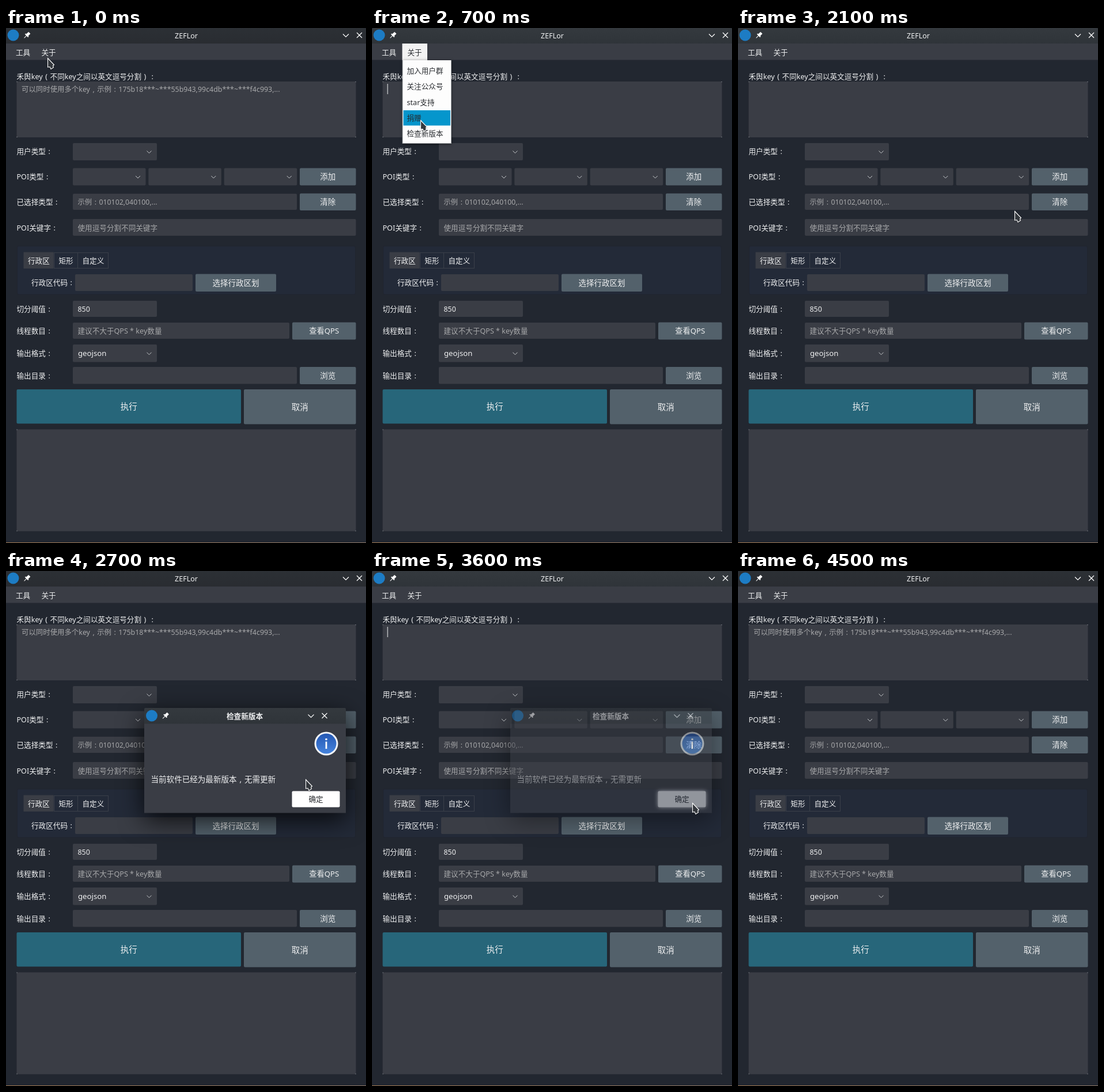
These frames come from a looping animation (625 px wide and 895 px high, 4.7 s). An HTML page with a canvas:

```html
<!DOCTYPE html>
<html lang="zh-CN">
<head>
<meta charset="utf-8">
<style>
html, body { margin: 0; width: 100%; height: 100%; overflow: hidden; background: #222730; }
canvas { display: block; }
</style>
</head>
<body>
<canvas id="stage" width="625" height="895"></canvas>
<script>
const stage = document.getElementById("stage").getContext("2d");
const layer = new OffscreenCanvas(625, 895).getContext("2d");
let ctx = stage;
const LOOP = 4700, STEP = 100;
const LIGHT = "#eff0f1", FIELD = "#3a3d45", BUTTON = "#53616b", HINT = "#a7a8aa", DARK = "#26292d";

// Pointer stops: time, x, y
const PATH = [
  [0, 72, 52], [100, 72, 50], [200, 72, 46], [300, 74, 62], [600, 84, 158], [700, 84, 160],
  [900, 101, 181], [1000, 101, 181], [1100, 106, 183], [1200, 175, 196], [1600, 455, 289],
  [1700, 477, 315], [1800, 480, 318], [2600, 480, 318], [2700, 520, 362], [2800, 552, 402],
  [3000, 552, 402], [3100, 560, 403], [3500, 560, 403], [3600, 556, 403], [3700, 536, 402],
  [4000, 410, 4], [4100, 400, -30], [4700, 400, -30]
];

function pointerAt(t) {
  const i = Math.max(1, PATH.findIndex(p => p[0] > t));
  const [t0, x0, y0] = PATH[i - 1], [t1, x1, y1] = PATH[i];
  const k = (t - t0) / (t1 - t0);
  return [x0 + (x1 - x0) * k, y0 + (y1 - y0) * k];
}

const ramp = (t, a, b) => Math.min(1, Math.max(0, (t - a) / (b - a)));

// Paints a group on its own layer so that it fades as a whole
function fade(alpha, paint) {
  if (!alpha) return;
  ctx = layer;
  ctx.clearRect(0, 0, 625, 895);
  ctx.save();
  paint();
  ctx.restore();
  ctx = stage;
  ctx.globalAlpha = alpha;
  ctx.drawImage(layer.canvas, 0, 0);
  ctx.globalAlpha = 1;
}

function shadow(color, blur = 0, dy = 0) {
  ctx.shadowColor = color;
  ctx.shadowBlur = blur;
  ctx.shadowOffsetY = dy;
}

function box(x0, y0, x1, y1, fill = FIELD, radius = 2) {
  ctx.fillStyle = fill;
  ctx.beginPath();
  ctx.roundRect(x0, y0, x1 - x0, y1 - y0, radius);
  ctx.fill();
}

// Full-width punctuation is centred in its cell
const NARROW = { "，": ",", "：": ":", "（": "(", "）": ")" };
const centred = str => str.replace(/[，：（）]/g, c => `\u200a ${NARROW[c]} \u200a`);

function text(str, x, y, { size = 12.6, color = LIGHT, align = "left", weight = 400 } = {}) {
  ctx.font = `${weight} ${size}px "Noto Sans", "Noto Sans CJK SC", sans-serif`;
  ctx.fillStyle = color;
  ctx.textAlign = align;
  ctx.fillText(centred(str), x, y + size * 0.37);
}

function stroke(points, color = LIGHT, width = 1) {
  ctx.strokeStyle = color;
  ctx.lineWidth = width;
  ctx.beginPath();
  points.forEach(([x, y]) => ctx.lineTo(x, y));
  ctx.stroke();
}

function disc(x, y, r, fill) {
  ctx.fillStyle = fill;
  ctx.beginPath();
  ctx.arc(x, y, r, 0, 7);
  ctx.fill();
}

const chevron = (x, y, r = 4, color = "#c4c7ca", width = 1) =>
  stroke([[x - r, y - r / 2], [x, y + r / 2], [x + r, y - r / 2]], color, width);

function button(label, x0, y0, x1, y1, size = 13.5, fill = BUTTON) {
  box(x0, y0, x1, y1, fill);
  text(label, (x0 + x1) / 2, (y0 + y1) / 2, { size, align: "center" });
}

function combo(x0, y0, x1, y1) {
  box(x0, y0, x1, y1);
  chevron(x1 - 13.5, (y0 + y1) / 2 + 0.5);
}

function pane(x0, y0, x1, y1) {
  box(x0, y0, x1, y1, FIELD, 1);
  ctx.fillStyle = "#a9acb0";
  for (const x of [x0, x1 - 1]) for (const y of [y0, y1 - 1]) ctx.fillRect(x, y, 1, 1);
}

function titleBar(x0, y0, x1, height, [top, bottom]) {
  const shade = ctx.createLinearGradient(0, y0, 0, y0 + height);
  shade.addColorStop(0, top);
  shade.addColorStop(1, bottom);
  box(x0, y0, x1, y0 + height, shade, [3, 3, 0, 0]);
}

function titleIcons(x, y, chevronX, closeX) {
  disc(x, y, 10, "#1d7cc4");
  ctx.save();
  ctx.translate(x + 24, y);
  ctx.rotate(Math.PI / 4);
  ctx.fillStyle = "#fff";
  ctx.fillRect(-2.3, -6, 4.6, 6);
  ctx.fillRect(-3.8, -0.5, 7.6, 2);
  ctx.fillRect(-0.5, 1, 1, 6);
  ctx.restore();
  chevron(chevronX, y + 0.5, 5, "#fff", 1.2);
  const r = 4.5;
  stroke([[closeX - r, y - r], [closeX + r, y + r]], "#fff", 1.2);
  stroke([[closeX - r, y + r], [closeX + r, y - r]], "#fff", 1.2);
}

function drawWindow(active, menuOpen, caret) {
  box(0, 0, 625, 895, "#222730", 0);
  titleBar(0, 0, 625, 28, active ? ["#34393e", "#2f3439"] : ["#2c3035", "#292c31"]);
  titleIcons(12.5, 12.5, 590, 613.5);
  text("ZEFLor", 313, 13, { size: 12.5, align: "center" });

  box(0, 27, 625, 55.5, FIELD, 0);
  if (menuOpen) box(52.5, 27, 96, 56, "#f3f3f3", 0);
  text("工具", 17, 42);
  text("关于", 61.5, 42, { color: menuOpen ? DARK : LIGHT });

  text("禾舆key（不同key之间以英文逗号分割）：", 18.5, 84);
  pane(18.5, 93, 607.5, 190);
  if (!active) text("可以同时使用多个key，示例：175b18***~***55b943,99c4db***~***f4c993,...", 27, 106.5, { size: 12.42, color: HINT });
  if (caret) box(26.5, 97, 27.7, 115, "#d5d7d9", 0);

  const labels = { "用户类型": 214.5, "POI类型": 258.5, "已选择类型": 302, "POI关键字": 347,
    "切分阈值": 488, "线程数目": 526, "输出格式": 565, "输出目录": 604 };
  for (const name in labels) text(name + "：", 18.5, labels[name]);

  combo(116, 200, 262, 230);
  for (const x of [116, 247.3, 378.7]) combo(x, 243.5, x + 126.5, 273.5);
  button("添加", 510, 243.5, 607.5, 273.5);

  box(116, 288, 505, 316);
  text("示例：010102,040100,...", 124.5, 302, { size: 12.35, color: HINT });
  button("清除", 510, 287.5, 607.5, 317);

  box(116, 332, 607.5, 361);
  text("使用逗号分割不同关键字", 124.5, 347, { color: HINT });

  box(19, 378.5, 607, 463.5, "#20252f");
  box(20, 379.5, 606, 462.5, "#232a38");
  box(30.5, 389.5, 82.5, 418, FIELD, 0);
  ctx.strokeStyle = "#3a3f49";
  ctx.lineWidth = 1;
  ctx.strokeRect(83.5, 390.5, 41, 27);
  ctx.strokeRect(124.5, 390.5, 53, 27);
  text("行政区", 38, 404.5);
  text("矩形", 91.5, 404.5);
  text("自定义", 132.5, 404.5);
  text("行政区代码：", 44, 442.5);
  box(120, 428, 324, 457);
  button("选择行政区划", 329, 427.5, 469, 458);

  box(116, 474, 262, 502);
  text("850", 124.5, 488.5, { size: 12.4 });
  box(116, 512, 492, 540);
  text("建议不大于QPS * key数量", 124.5, 526, { color: HINT });
  button("查看QPS", 497, 511.5, 607.5, 541.5, 13.2);
  combo(116, 550, 262, 580.5);
  text("geojson", 125, 565, { size: 13.2 });
  box(116, 589, 505, 618.5);
  button("浏览", 510, 589, 607.5, 619);
  button("执行", 18.5, 628, 408, 687.5, 14.5, "#27667a");
  button("取消", 413, 628, 607.5, 688.5, 14.5);
  pane(18.5, 697.5, 607.5, 874.5);

  const edge = ctx.createLinearGradient(0, 0, 625, 0);
  edge.addColorStop(0, "#a07850");
  edge.addColorStop(1, "#8d7868");
  box(0, 894, 625, 895, edge, 0);
}

function drawMenu(selected) {
  shadow("rgba(0,0,0,.5)", 5, 1);
  box(52.5, 56, 138, 201, "#9a9da0", 0);
  shadow("transparent");
  box(53.5, 56, 137, 200, "#fdfdfd", 0);
  ["加入用户群", "关注公众号", "star支持", "捐赠", "检查新版本"].forEach((item, i) => {
    const y = 61 + 27.2 * i;
    if (i === selected) box(54.5, y + 0.5, 136, y + 27, "#0596cc", 0);
    text(item, 60.5, y + 13.5, { color: DARK });
  });
}

function drawDialog(hover) {
  shadow("rgba(0,0,0,.8)", 44, 12);
  box(240, 238, 590, 420.5, FIELD, [3, 3, 0, 0]);
  shadow("transparent");
  titleBar(240, 238, 590, 27.5, ["#34393e", "#2f3439"]);
  titleIcons(253, 251.5, 529.5, 553);
  text("检查新版本", 414.5, 252.5, { align: "center", weight: 700 });

  disc(556, 300, 20.5, "#f4f6f8");
  const blue = ctx.createLinearGradient(0, 283, 0, 317);
  blue.addColorStop(0, "#2458b4");
  blue.addColorStop(1, "#4583dc");
  disc(556, 300, 17.5, blue);
  disc(556, 292.5, 1.8, "#fff");
  box(554.6, 296.5, 557.4, 309, "#fff", 0);

  text("当前软件已经为最新版本，无需更新", 251.5, 361.5, { size: 13.55 });
  if (hover) shadow("#fff", 7);
  box(496.5, 382.5, 579.5, 410.5, "#fff");
  shadow("transparent");
  text("确定", 538, 396.5, { align: "center", color: DARK });
}

function drawPointer(x, y) {
  ctx.save();
  ctx.translate(x, y);
  shadow("rgba(0,0,0,.4)", 3, 1);
  ctx.beginPath();
  for (const [px, py] of [[0.5, 0.5], [11.5, 12], [9.5, 13.5], [10.5, 16.5], [6, 19.5], [4, 15.5], [0.5, 16]]) ctx.lineTo(px, py);
  ctx.closePath();
  ctx.fillStyle = "#34383d";
  ctx.fill();
  shadow("transparent");
  ctx.strokeStyle = "#fff";
  ctx.lineWidth = 1.1;
  ctx.stroke();
  ctx.restore();
}

function draw(now) {
  const t = Math.floor(now % LOOP / STEP) * STEP;
  const [x, y] = pointerAt(t);
  const early = t >= 200 && t <= 2100;
  const late = t >= 3600 && t < 4300;
  const blinkStart = late ? 3600 : 300;
  const caret = (early || late) && t >= blinkStart && (t - blinkStart) % 1000 < 500;
  drawWindow(early || late, t >= 200 && t < 1100, caret);

  const selected = t >= 900 ? 4 : Math.floor((y - 61) / 27.2);
  fade(ramp(t, 100, 300) * (1 - ramp(t, 1100, 1267)), () => drawMenu(selected));
  fade(ramp(t, 2100, 2300) * (1 - ramp(t, 3500, 3700)), () => drawDialog(t >= 2800));
  drawPointer(x, y);
  requestAnimationFrame(draw);
}
requestAnimationFrame(draw);
</script>
</body>
</html>
```
